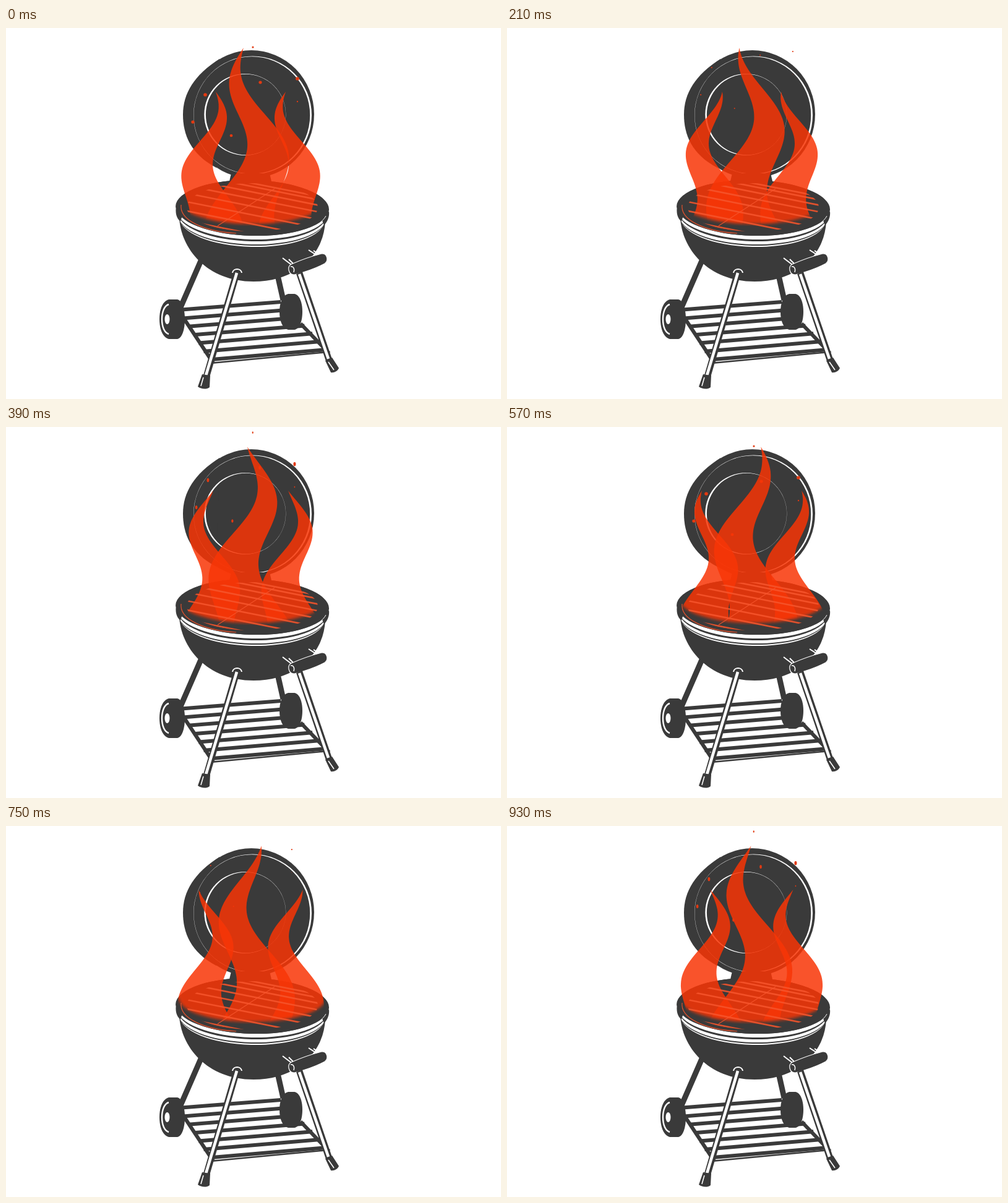
An HTML page that plays this animation: 800x600 px, repeating every 0.99 s.

```html
<!DOCTYPE html>
<html lang="en">
<head>
<meta charset="utf-8">
<title>Barbecue</title>
<style>
  html, body { margin: 0; width: 100%; height: 100%; overflow: hidden; background: #fff; }
  svg { display: block; width: 800px; height: 600px; }
  .d { fill: #3a3a3a; }
  .w { fill: #fff; }
  .ld { stroke: #3a3a3a; fill: none; }
  .lw { stroke: #fff; fill: none; }
</style>
</head>
<body>
<svg viewBox="0 0 800 600">
  <defs>
    <filter id="soft" filterUnits="userSpaceOnUse" x="0" y="0" width="800" height="600">
      <feGaussianBlur stdDeviation="2.6"/>
    </filter>
    <mask id="base" maskUnits="userSpaceOnUse" x="0" y="0" width="800" height="600">
      <g filter="url(#soft)" fill="#fff">
        <rect x="-20" y="-20" width="840" height="299"/>
        <ellipse cx="398" cy="278" rx="119" ry="39"/>
      </g>
    </mask>
    <clipPath id="grid"><ellipse cx="398" cy="290" rx="106" ry="39"/></clipPath>
  </defs>

  <!-- shelf -->
  <g id="slats" class="ld" stroke-width="6"></g>
  <path class="ld" stroke-width="6" d="M285 466L335 542M476 478L522 526"/>
  <path class="ld" stroke-width="2.5" d="M331 542L521 524"/>

  <!-- back legs and wheels -->
  <path class="ld" stroke-width="9" d="M316 374L282 452M439 400L448 440"/>
  <path class="d" d="M456 430H466C474 431 479 443 479 459C479 475 474 487 466 488H456C447 486 442 474 442 459C442 444 447 432 456 430Z"/>
  <path class="d" d="M263 439H277C285 441 289 455 289 471C289 487 285 501 277 503H263C254 501 248 488 248 471C248 454 254 441 263 439Z"/>
  <path class="lw" stroke-width="2.4" d="M263 447C256 449 252 459 252 471C252 483 256 493 263 495"/>
  <ellipse class="w" cx="260.5" cy="471" rx="4" ry="8"/>

  <!-- lid: each ring is a crescent, thin on one side -->
  <ellipse class="d" cx="396.5" cy="139.5" rx="101.5" ry="103.5"/>
  <path class="d" d="M345 50C304 76 286 106 286 140C286 172 298 204 340 226Z"/>
  <path class="w" fill-rule="evenodd" d="M303 141a95.5 95.5 0 1 0 191 0a95.5 95.5 0 1 0 -191 0M303.300 141a94 94.700 0 1 0 188 0a94 94.700 0 1 0 -188 0"/>
  <path class="w" fill-rule="evenodd" d="M320.300 140a66 66 0 1 0 132 0a66 66 0 1 0 -132 0M322.900 140a64.600 65.200 0 1 0 129.200 0a64.600 65.200 0 1 0 -129.200 0"/>
  <path class="d" d="M364 235H426L430 252H360Z"/>

  <!-- bowl -->
  <path class="d" d="M280 306C282 356 324 410 400 410C470 410 514 366 516 312Z"/>
  <g id="rim" transform="rotate(1.3 398 294)"></g>
  <path class="d" d="M274.500 293C274 303 277 309 282 313L286 300ZM522 297C523 306 519 314 514 319L508 304Z"/>
  <path class="lw" stroke-width="1" d="M517 304C512 313 502 320 488 325"/>

  <!-- handle -->
  <path class="lw" stroke-width="2" d="M447 372L464 385M457 374L466 383M489 359L503 368M497 360L507 367"/>
  <path class="d" stroke="#fff" stroke-width="1.2" d="M461 382C475 376 494 369 510 365C519 364 522 376 515 381C500 389 482 395 466 399C456 399 454 386 461 382Z"/>
  <path class="lw" stroke-width="1.4" d="M460 386C464 385 467 389 465 395"/>

  <!-- front legs -->
  <path class="ld" stroke-width="10.500" d="M374 392L324 563M474 396L522 537"/>
  <path class="lw" stroke-width="4.600" d="M373 396L323 562M474 398L521 535"/>
  <path class="lw" stroke-width="2" d="M366 396C367 388 380 388 381 396"/>
  <path class="d" d="M317 560L330 562L329 581C324 585 315 584 310 580ZM516 538L527 533L538 550C536 555 530 558 525 557Z"/>
  <path class="lw" stroke-width="1.6" d="M319 565L315 579M521 540L530 553"/>

  <g id="sparks" fill="#e23a12"></g>
  <g id="flames" mask="url(#base)" fill="#f83606" fill-opacity=".85"></g>

  <!-- glowing grate -->
  <g fill="none" stroke="#f6552c" stroke-opacity=".88">
    <g id="grate" clip-path="url(#grid)" stroke-width="2.6"></g>
    <path stroke-width="1.2" d="M342 320L434 260M283 286C280 310 318 329 372 332"/>
  </g>
</svg>
<script>
const NS = 'http://www.w3.org/2000/svg';
const $ = id => document.getElementById(id);
const add = (parent, tag, attrs = {}) => {
  const el = parent.appendChild(document.createElementNS(NS, tag));
  for (const k in attrs) el.setAttribute(k, attrs[k]);
  return el;
};

// Slats run between the two slanting sides of the shelf.
for (let i = 0; i < 7; i++) {
  const a = 456 + 13.4 * i, b = 443 + 12.8 * i;
  add($('slats'), 'path', { d: `M${286 + 0.62 * (a - 469)} ${a}L${b + 1} ${b}` });
}

// Grate bars spread out towards the viewer.
for (let i = 0; i < 8; i++) {
  const y = 251 + 82 * (i / 7) ** 1.4;
  add($('grate'), 'path', { d: `M270 ${y - 25.6}L526 ${y + 25.6}` });
}

// Stacked ellipses leave alternating stripes under the rim.
[354, 352, 350, 345, 342, 336].forEach((bottom, i) => {
  add($('rim'), 'ellipse', {
    cx: 398, cy: bottom - 45, rx: 117 + i * 1.2, ry: 45, class: i % 2 ? 'd' : 'w'
  });
});
add($('rim'), 'ellipse', { cx: 398, cy: 291, rx: 124, ry: 45, class: 'd' });

const STEPS = 11;
const FOOT = 320;

// A flame widens evenly below its tip while a sine wave climbs through it.
// peak: step at which the wave pushes the tip furthest to the right.
const side = { x: 462, tip: 103, length: 195, peak: 7.3, sway: 21 };
const flames = [
  { ...side, mirror: true },
  side,
  { x: 395, tip: 32, length: 259, peak: 7.2, sway: 28 }
];

function flamePath(f, step) {
  const edge = (y, dir) => {
    const turn = (step - f.peak) / STEPS + (y - f.tip) / f.length;
    const sway = f.sway - ((y - 170) / 48) ** 2;
    const x = f.x + dir * 0.2 * (y - f.tip) + sway * Math.cos(2 * Math.PI * turn);
    return `${(f.mirror ? 791 - x : x).toFixed(1)} ${y}`;
  };
  const l = [], r = [];
  for (let y = f.tip; y <= FOOT; y += 4) {
    l.push(edge(y, -1));
    r.unshift(edge(y, 1));
  }
  return `M${l.join('L')}L${r.join('L')}Z`;
}
const shapes = flames.map(() => add($('flames'), 'path'));

// Sparks: start x, y and radius; they rise for three steps, drift inwards and shrink.
const sparks = [[399, 31, 1.6], [411, 88, 2.6], [471, 82, 2.9], [471, 119, 1.2],
                [322, 108, 2.8], [302, 152, 2.7], [364, 174, 2.4]];
const dots = sparks.map(() => add($('sparks'), 'ellipse'));

function moveSparks(age) {
  sparks.forEach(([x, y, r], i) => {
    const size = r * (1 - 0.3 * age);
    const at = {
      cx: x + (395 - x) * 0.06 * age, cy: y - 22 * age,
      rx: size, ry: size * (age === 1 ? 1.6 : 0.95)
    };
    for (const k in at) dots[i].setAttribute(k, at[k]);
  });
}

let shown = -1;
function draw(now) {
  const t = now % 990;
  const step = t < 120 ? 0 : 1 + Math.floor((t - 120) / 90);
  if (step === shown) return;
  shown = step;
  flames.forEach((f, i) => shapes[i].setAttribute('d', flamePath(f, step)));
  moveSparks(step % 3);
}

const start = performance.now();
function tick() {
  draw(performance.now() - start);
  requestAnimationFrame(tick);
}
tick();
</script>
</body>
</html>
```
